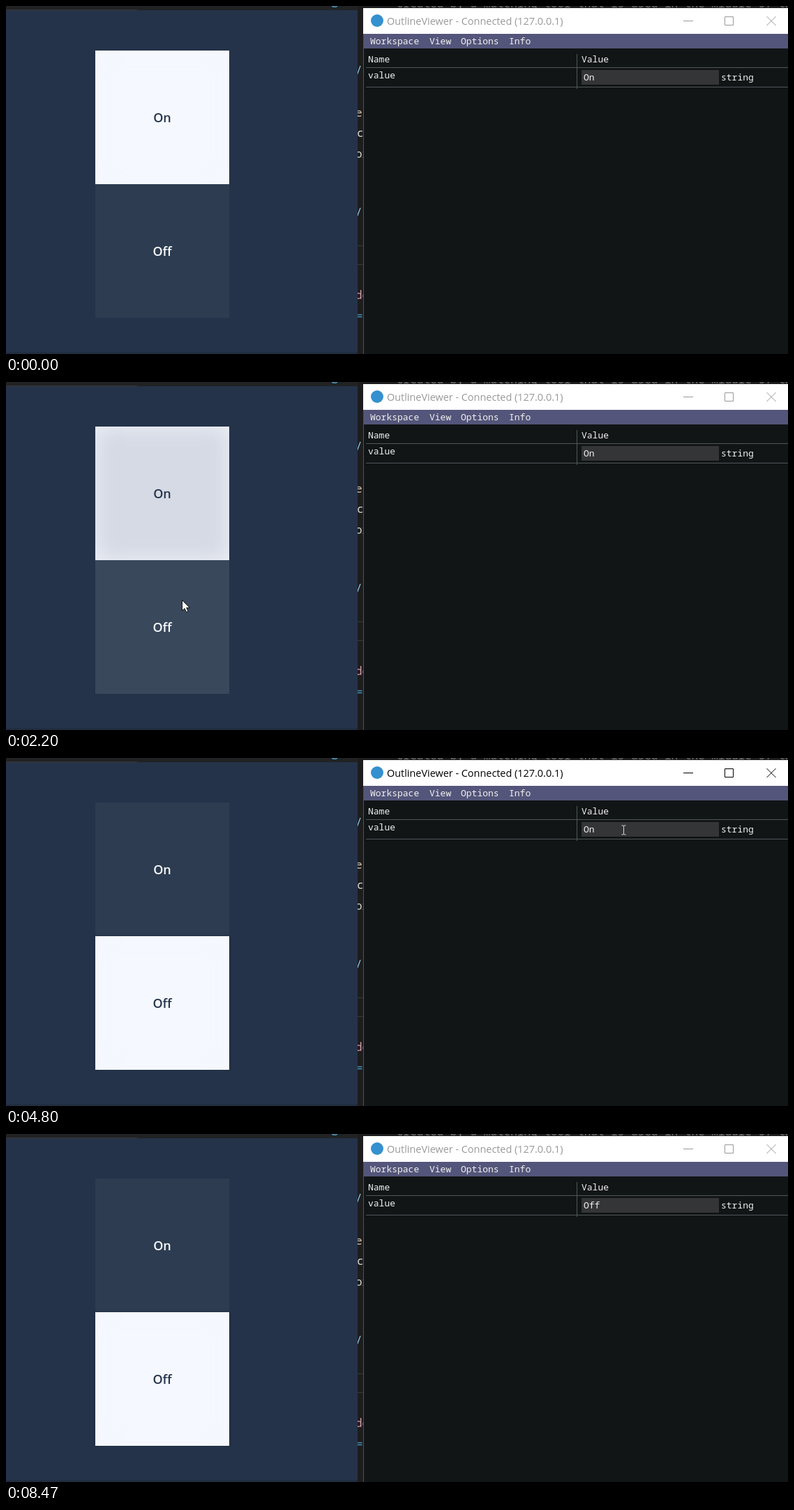
Write an HTML page that moves like this. It is 1121 by 500 pixels and loops after 8.59 s.

```html
<!DOCTYPE html>
<html lang="en">
<head>
<meta charset="utf-8">
<title>Toggle buttons</title>
<style>
html, body { margin: 0; width: 100%; height: 100%; overflow: hidden; background: #243349; }
svg, .button { position: absolute; left: 0; top: 0; }
.button {
  left: 128px; width: 192px; height: 192px;
  font: 600 18px/192px "Open Sans", sans-serif; text-align: center;
}
#on { top: 64px; }
#off { top: 256px; }
.mono { font: 13px "Noto Sans Mono", monospace; fill: #f2f2f2; white-space: pre; }
.code { font: 16px "Noto Sans Mono", monospace; }
#caption { font: 14.43px "Open Sans", sans-serif; }
</style>
</head>
<body>
<svg width="1121" height="500" viewBox="0 0 1121 500">
  <rect width="1121" height="500" fill="#1d1c1e"/>
  <rect y="6" width="504" height="494" fill="#243349"/>
  <rect y="497" width="504" height="3" fill="#212e42"/>
  <rect width="504" height="6" fill="#212223"/>
  <rect y="5" width="188" height="1.5" fill="#353535"/>
  <path d="M467 0q4 2.5 8 0" fill="none" stroke="#4c9ccb" stroke-width="1.5"/>
  <svg x="504" width="617" height="500" viewBox="504 0 617 500">
    <g class="code">
      <text x="501" y="98" fill="#8cc5e2">/;</text>
      <text x="501" y="159" fill="#d8c9bd">e:</text>
      <text x="503" y="188" fill="#d8d8d8">co</text>
      <text x="501" y="218" fill="#d8d8d8">or</text>
      <text x="501" y="302" fill="#8cc5e2">/;</text>
      <text x="501" y="421" fill="#d59bb0">de</text>
      <text x="502" y="451" fill="#4c9ccb">==</text>
      <text x="560" y="2" fill="#777">created by a matching tool that is used in the middle of the button</text>
    </g>
    <path d="M504 344.500h9M504 371.500h9" stroke="#39393b"/>
  </svg>

  <rect x="512" y="3" width="609" height="497" fill="#505355"/>
  <rect x="513" y="61" width="608" height="439" fill="#111516"/>
  <rect x="512" y="3" width="609" height="37" fill="#fff"/>
  <rect x="513" y="40" width="608" height="21" fill="#54557a"/>
  <circle cx="532" cy="21" r="9" fill="#3590cf"/>
  <text id="caption" x="546" y="27">OutlineViewer - Connected (127.0.0.1)</text>
  <path id="controls" d="M971 21.500h14M1030.500 15.500h12v12h-12zM1090.500 15l13 13M1103.500 15l-13 13" fill="none"/>
  <path d="M516 88.500h605M516 116.500h605M818.500 69v50" stroke="#515658"/>
  <rect x="825" y="92" width="197" height="21" fill="#343537"/>
  <rect id="selection" x="829" y="93" height="19" fill="#385476"/>
  <g class="mono">
    <text x="522" y="55">Workspace</text>
    <text x="607" y="55">View</text>
    <text x="652" y="55">Options</text>
    <text x="721" y="55">Info</text>
    <text x="519" y="81">Name</text>
    <text x="825" y="81">Value</text>
    <text x="519" y="104">value</text>
    <text x="1025" y="107">string</text>
    <text id="value" x="828" y="107"></text>
  </g>
  <rect id="caret" y="95" width="1" height="14" fill="#fff"/>
</svg>
<div class="button" id="on">On</div>
<div class="button" id="off">Off</div>
<svg width="1121" height="500" viewBox="0 0 1121 500">
  <path id="arrow" d="M.5 .5V15.500L4 12.300L6.500 17.500L9 16.500L6.700 11.300H11.300Z" fill="#fff" stroke="#111" stroke-width="1"/>
  <path id="beam" d="M-3 -6.500h2.500l.5 .5l.5 -.5h2.500M0 -6V6M-3 6.500h2.500l.5 -.5l.5 .5h2.500" fill="none" stroke="#d8d8d8"/>
</svg>
<script>
const LOOP = 8590, CHAR = 7.8;
const el = id => document.getElementById(id);

// Button shades in order: idle, hovered, pressed, selected
const shades = [[45, 60, 80], [57, 72, 91], [181, 188, 200], [245, 248, 255]];

const onLevels = [[0, 3], [930, 3], [1000, 0], [1600, 0], [1680, 1], [1800, 1], [1870, 2],
  [1950, 2], [2250, 2.6], [2320, 1], [2500, 1], [2850, 0], [4999, 0], [5000, 3], [6799, 3], [6800, 0]];
const offLevels = [[0, 0], [800, 0], [870, 1], [930, 1], [1000, 2], [1270, 2], [1770, 3], [1800, 3],
  [1870, 0], [2100, 0], [2170, 1], [2230, 1], [2300, 2], [2365, 2], [2865, 3],
  [4999, 3], [5000, 0], [6799, 0], [6800, 3]];
const pointer = [[130, 1110, 486], [400, 409, 312], [610, 409, 312], [930, 270, 331], [1400, 270, 331],
  [1750, 250, 190], [1950, 250, 190], [2200, 252, 313], [2365, 252, 313], [2530, 864, 145],
  [2930, 888, 128], [3470, 885, 103], [7210, 885, 103], [7800, 83, 358], [8010, 83, 358], [8330, 77, 500]];
const values = [[0, "On"], [1000, "Off"], [1870, "On"], [2300, "Off"], [4070, "O"], [4330, "On"],
  [6000, "O"], [6270, "Of"], [6400, "Off"]];

const within = (t, ...spans) => spans.some(([from, to]) => t >= from && t < to);
const linear = k => k;
const smooth = k => k * k * (3 - 2 * k);
const show = (node, visible) => node.style.display = visible ? "" : "none";

function sample(keys, t, ease) {
  const next = keys.findIndex(key => key[0] > t);
  if (next < 0) return keys.at(-1).slice(1);
  if (next === 0) return keys[0].slice(1);
  const a = keys[next - 1], b = keys[next];
  const k = ease((t - a[0]) / (b[0] - a[0]));
  return a.slice(1).map((v, i) => v + (b[i + 1] - v) * k);
}

function paintButton(node, level) {
  const i = Math.min(2, Math.floor(level));
  const fill = shades[i].map((v, c) => v + (shades[i + 1][c] - v) * (level - i));
  const lit = level > 1.5;
  const shadows = [];
  if (level > 2) shadows.push("inset 0 0 30px rgba(245,248,255,.8)");
  if (level > 0 && level < 1) shadows.push("inset 0 0 24px rgba(45,60,80,.7)");
  if (lit && node.id === "off") shadows.push("0 -1px 3px rgba(35,36,58,.5)");
  node.style.background = `rgb(${fill.map(Math.round)})`;
  node.style.color = lit ? "#24344b" : "#f8faff";
  node.style.boxShadow = shadows.join() || "none";
}

function paintPointer(t) {
  const [x, y] = sample(pointer, t, smooth);
  const visible = within(t, [130, 8330]);
  const overField = x > 825 && x < 1022 && y > 91 && y < 114;
  show(el("arrow"), visible && !overField);
  show(el("beam"), visible && overField);
  el("arrow").setAttribute("transform", `translate(${Math.round(x)} ${Math.round(y)})`);
  el("beam").setAttribute("transform", `translate(${Math.round(x) + .5} ${Math.round(y) + .5})`);
}

function paintField(t) {
  const text = values.findLast(([start]) => t >= start)[1];
  const width = text.length * CHAR;
  el("value").textContent = text;
  el("selection").setAttribute("width", width);
  el("caret").setAttribute("x", Math.floor(828.6 + width));
  show(el("selection"), within(t, [3530, 4070], [5600, 6000]));
  show(el("caret"), within(t, [4070, 4800], [5470, 5600], [6000, 6730]));
}

function paint(now) {
  const step = Math.floor((now % LOOP + 4) * 0.015);
  const t = Math.round(step * 100 / 15) * 10;
  const active = within(t, [3330, 8470]);
  paintButton(el("on"), sample(onLevels, t, linear)[0]);
  paintButton(el("off"), sample(offLevels, t, linear)[0]);
  paintField(t);
  paintPointer(t);
  el("caption").setAttribute("fill", active ? "#000" : "#999");
  el("controls").setAttribute("stroke", active ? "#000" : "#999");
}

const began = performance.now();
function tick() {
  paint(performance.now() - began);
  requestAnimationFrame(tick);
}
tick();
</script>
</body>
</html>
```
